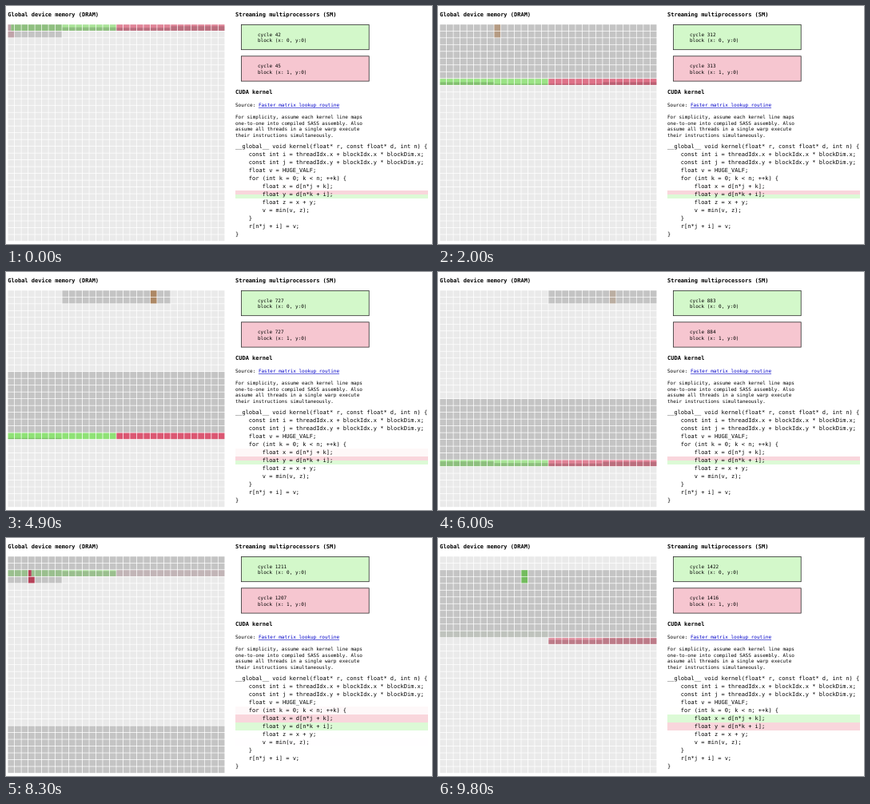
Recreate the animation shown at these times as an HTML page with a canvas. Size 533 by 298 pixels, loop 9900 ms.

```html
<!DOCTYPE html>
<html lang="en">
<head>
<meta charset="utf-8">
<title>Memory access</title>
<style>
html, body { margin: 0; width: 100%; height: 100%; overflow: hidden; background: #fff; }
canvas, svg { position: absolute; left: 0; top: 0; width: 533px; height: 298px; }
text { font-family: "DejaVu Sans Mono", monospace; font-size: 6px; white-space: pre; fill: #000; }
.head { font-size: 7px; font-weight: bold; }
.code { font-size: 7px; }
.link { fill: #0000c8; text-decoration: underline; }
</style>
</head>
<body>
<canvas id="grid"></canvas>
<svg id="stage" viewBox="0 0 533 298"></svg>
<script>
const stage = document.getElementById('stage');
const canvas = document.getElementById('grid');
const ctx = canvas.getContext('2d');
const scale = window.devicePixelRatio || 1;
canvas.width = 533 * scale;
canvas.height = 298 * scale;
ctx.scale(scale, scale);

const N = 32, PITCH = 8.49, CELL = 7.75, LEFT = 2.5, TOP = 23.2;
const LIGHT = [234, 234, 234];
const TINT = [[124, 224, 94], [217, 67, 98]];
const MIXED = [200, 144, 90];
const BOX = ['#d3f8ca', '#f6c6d0'];
const LINE = ['#dcfad6', '#f9d6dc'];

// Seconds, then per multiprocessor: loop position and cycle counter
const KEYS = [0, 2, 3.4, 4.9, 7, 8.3, 9.8];
const POS = [
  [0.56, 8.4, 15.8, 21.28, 29.42, 34.695, 44.14],
  [0.53, 8.4, 15.8, 21.22, 29.42, 35.08, 44.62]
];
const CYCLE = [
  [42, 312, 512, 727, 1025, 1211, 1422],
  [45, 313, 514, 727, 1026, 1207, 1416]
];
// Start of each instruction within one iteration
const STEP = [0, 0.06, 0.2, 0.82, 0.9, 1];
const X_AT = STEP[1], Y_AT = STEP[2], KEEP = 10;

const clamp = v => Math.max(0, Math.min(1, v));

function lerpAt(t, values) {
  let i = 0;
  while (i < KEYS.length - 2 && t >= KEYS[i + 1]) i++;
  const f = (t - KEYS[i]) / (KEYS[i + 1] - KEYS[i]);
  return values[i] + (values[i + 1] - values[i]) * f;
}

function add(tag, attrs, content) {
  const el = document.createElementNS('http://www.w3.org/2000/svg', tag);
  for (const key in attrs) el.setAttribute(key, attrs[key]);
  if (content) el.textContent = content;
  stage.appendChild(el);
  return el;
}
const label = (x, y, content, cls = '') => add('text', { x, y, class: cls }, content);

const bars = [0, 1, 2, 3, 4].map(i => [0, 1].map(sm =>
  add('rect', { x: 287, y: 211 + i * 10, width: 241, height: 10, fill: LINE[sm] })));

label(2.3, 12.5, 'Global device memory (DRAM)', 'head');
label(287, 12.5, 'Streaming multiprocessors (SM)', 'head');
label(287, 109.5, 'CUDA kernel', 'head');

const counters = [0, 1].map(sm => {
  const y = 23.4 + sm * 39.4;
  add('rect', { x: 294.6, y, width: 159.6, height: 31.3, fill: BOX[sm], stroke: '#222', 'stroke-width': 0.75 });
  label(315, y + 21.9, `block (x: ${sm}, y:0)`);
  return label(315, y + 14.2, '');
});

label(287, 126.2, 'Source:');
label(315.9, 126.2, 'Faster matrix lookup routine', 'link');
[
  'For simplicity, assume each kernel line maps',
  'one-to-one into compiled SASS assembly. Also',
  'assume all threads in a single warp execute',
  'their instructions simultaneously.'
].forEach((s, i) => label(287, 141.2 + i * 7.5, s));

[
  '__global__ void kernel(float* r, const float* d, int n) {',
  '    const int i = threadIdx.x + blockIdx.x * blockDim.x;',
  '    const int j = threadIdx.y + blockIdx.y * blockDim.y;',
  '    float v = HUGE_VALF;',
  '    for (int k = 0; k < n; ++k) {',
  '        float x = d[n*j + k];',
  '        float y = d[n*k + i];',
  '        float z = x + y;',
  '        v = min(v, z);',
  '    }',
  '    r[n*j + i] = v;',
  '}'
].forEach((s, i) => label(287, 178.1 + i * 10, s, 'code'));

// How far a cell has been fetched into the cache, 0 to 1
function cached(row, col, pos) {
  const sm = col >> 4, line = col >> 3;
  const oldest = Math.min(...pos), newest = Math.max(...pos);
  const lag = line === 1 || line === 2 ? 0.25 : 0;
  let level = 0;
  for (const k of [row, row + N]) {
    const start = k + Y_AT;
    if (pos[sm] >= start && oldest - start < KEEP)
      level = Math.max(level, (pos[sm] - start) / 0.45 - lag);
  }
  const pair = row >> 1;
  if (pair < 2) {
    const first = pair * N + line * 8;
    const since = newest - first - X_AT;
    if (since >= 0) {
      const last = first + Math.min(7, Math.floor(since)) + X_AT;
      if (oldest - last < KEEP) level = Math.max(level, since / 0.1);
    }
  }
  return clamp(level);
}

// Strength of one multiprocessor's highlight on a cell
function touched(row, col, sm, p) {
  const k = Math.floor(p), f = p - k;
  let x = 0, y = 0;
  if (f >= X_AT && col === k % N && row >> 1 === Math.floor(k / N))
    x = 0.95 * Math.sqrt(clamp(1 - (f - X_AT) / 0.5));
  if (col >> 4 === sm)
    for (const v of [k, k - 1]) {
      const since = p - v - Y_AT;
      if (v >= 0 && since >= 0 && row === v % N)
        y = Math.max(y, 0.9 * clamp(1 - since));
    }
  return { x, y, a: Math.max(x, y) };
}

function fill(color, a, x, y, w) {
  const c = LIGHT.map((v, i) => Math.round(v + (color[i] - v) * a));
  ctx.fillStyle = `rgb(${c})`;
  ctx.fillRect(x, y, w, CELL);
}

function drawCell(row, col, pos) {
  const x = LEFT + col * PITCH, y = TOP + row * PITCH;
  const [g, r] = pos.map((p, sm) => touched(row, col, sm, p));
  if (g.a && r.a) {
    if (g.x && r.x) fill(MIXED, Math.max(g.x, r.x), x, y, CELL);
    else {
      fill(TINT[1], r.a, x, y, CELL / 2);
      fill(TINT[0], g.a, x + CELL / 2, y, CELL / 2);
    }
  } else fill(TINT[r.a ? 1 : 0], g.a || r.a, x, y, CELL);
  const h = CELL * cached(row, col, pos);
  if (h > 0) {
    ctx.fillStyle = 'rgba(0,0,0,0.165)';
    ctx.fillRect(x, y + CELL - h, CELL, h);
  }
}

function drawBars(pos) {
  bars.forEach((pair, i) => {
    const power = pos.map(p => {
      const f = p % 1;
      if (f >= STEP[i] && f < STEP[i + 1]) return 1;
      return 0.35 * Math.exp(-((f - STEP[i + 1] + 1) % 1) / 0.03);
    });
    const both = power[0] === 1 && power[1] === 1;
    pair.forEach((bar, sm) => {
      bar.setAttribute('opacity', power[sm] < 0.01 ? 0 : power[sm]);
      bar.setAttribute('height', both ? 5 : 10);
      bar.setAttribute('y', 211 + i * 10 + (both && sm === 0 ? 5 : 0));
    });
  });
}

function draw(t) {
  const pos = POS.map(v => lerpAt(t, v));
  ctx.fillStyle = '#fff';
  ctx.fillRect(0, 0, 533, 298);
  for (let row = 0; row < N; row++)
    for (let col = 0; col < N; col++) drawCell(row, col, pos);
  drawBars(pos);
  counters.forEach((el, sm) => {
    el.textContent = 'cycle ' + Math.round(lerpAt(t, CYCLE[sm]));
  });
}

let shown = -1;
const begin = performance.now();
function tick() {
  const step = Math.floor((performance.now() - begin) / 100) % 99;
  if (step !== shown) draw((shown = step) / 10);
  requestAnimationFrame(tick);
}
tick();
</script>
</body>
</html>
```
